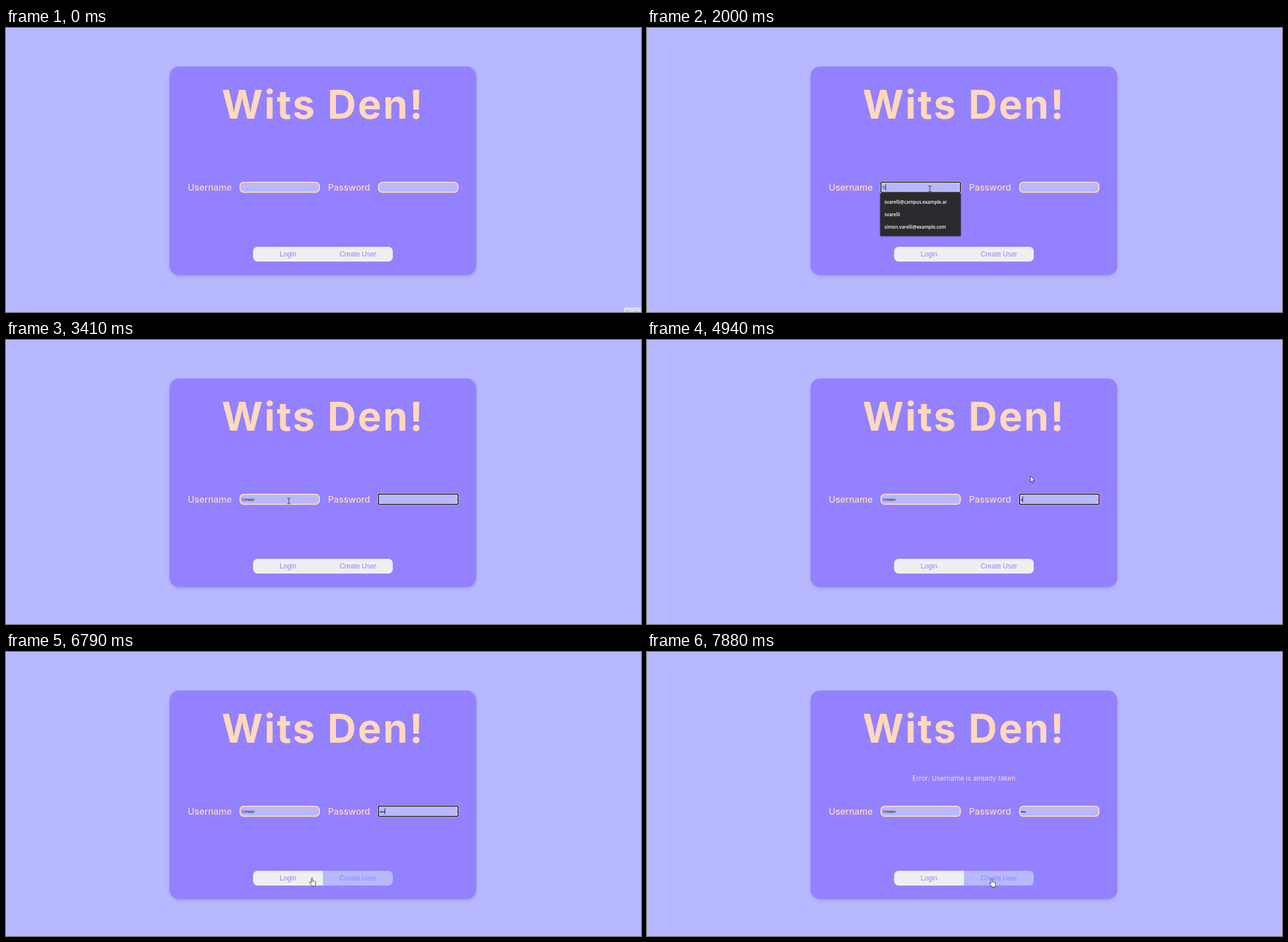
These frames come from a looping animation (1118x501 px, 8 s). An HTML page:

```html
<!DOCTYPE html>
<html lang="en">
<head>
<meta charset="utf-8">
<title>Wits Den!</title>
<style>
  html, body { margin: 0; width: 100%; height: 100%; overflow: hidden; background: #b8b8ff; }
  svg { display: block; width: 100vw; height: 100vh; }
  text { font-family: Inter, sans-serif; fill: #ffd8be; white-space: pre; }
  .mid { text-anchor: middle; }
  .card { fill: #9381ff; filter: drop-shadow(0 2px 3px rgba(60, 40, 140, .18)); }
  .title { font-size: 70px; font-weight: 700; letter-spacing: 2.8px; }
  .label { font-size: 15.8px; font-weight: 500; }
  .error { font-size: 11.75px; }
  .field { fill: #b8b8ff; stroke: #ffd8be; stroke-width: 2; }
  .ring { fill: none; stroke: #101010; stroke-width: 1.5; }
  .ring .halo { stroke: #fff; stroke-width: .8; }
  .button { fill: #efefef; }
  .button.hover { fill: #b8b8ff; }
  .caption { font: 12px "Liberation Sans", Arial, sans-serif; fill: #9381ff; }
  .typed { font: 8px "Liberation Sans", Arial, sans-serif; fill: #000; }
  .typed .pale { fill: #3d3a5c; }
  #list rect { fill: #2a2b2e; filter: drop-shadow(0 1px 1px rgba(0, 0, 0, .35)); }
  #list text { font: 600 8px "Open Sans", "Noto Sans", sans-serif; fill: #fff; }
  #tip text { font: 10px "Liberation Sans", Arial, sans-serif; fill: #999; }
  #cursor path { fill: #fff; stroke: #111; stroke-width: .8; stroke-linejoin: round; }
  #cursor .beam { fill: none; stroke: #333; stroke-width: 1; }
</style>
</head>
<body>
<svg viewBox="0 0 1118 501">
  <rect class="card" x="288" y="68" width="540" height="368" rx="17"/>
  <text class="title mid" x="558" y="160">Wits Den!</text>
  <text class="error mid" id="error" x="558" y="226.6">Error: Username is already taken</text>

  <text class="label" x="320" y="287">Username</text>
  <text class="label" x="567" y="287">Password</text>
  <rect class="field" id="field" x="412" y="272.3" width="139.7" height="17.4" rx="6.5"/>
  <use href="#field" x="244"/>
  <g id="ring" class="ring">
    <rect class="halo" x="410.8" y="271.1" width="142.1" height="19.8" rx="3"/>
    <rect x="411.8" y="272.1" width="140.1" height="17.8" rx="2.5"/>
  </g>
  <text class="typed" id="name" y="284"><tspan class="pale" id="head" x="414.5"></tspan><tspan id="tail"></tspan></text>
  <text class="typed" id="dots" x="658.3" y="284"></text>
  <rect id="caret" y="276" width=".9" height="10"/>

  <path class="button" id="login" d="M443 386h115v26h-115a8 8 0 0 1-8-8v-10a8 8 0 0 1 8-8z"/>
  <path class="button" id="create" d="M673 386h-115v26h115a8 8 0 0 0 8-8v-10a8 8 0 0 0-8-8z"/>
  <text class="caption mid" x="496.5" y="403">Login</text>
  <text class="caption mid" x="619.5" y="403">Create User</text>

  <g id="list"></g>
  <g id="tip">
    <rect x="1088" y="493" width="40" height="16" fill="#dcdcec"/>
    <text x="1091" y="505.5">Captura</text>
  </g>
  <g id="cursor">
    <path id="arrow" d="M0 0V10.8L2.5 8.5L4.2 12.3L5.9 11.5L4.2 7.8H7.4Z"/>
    <path id="beam" class="beam" d="M-3-5H-1Q0-5 0-4Q0-5 1-5H3M0-4V4M-3 5H-1Q0 5 0 4Q0 5 1 5H3"/>
    <path id="hand" d="M-1.2 8.5V1.2a1.2 1.2 0 0 1 2.4 0V6c.3-1 2-.8 2.1.3c.5-.7 1.8-.5 1.9.5c.6-.5 1.5-.2 1.5.8V10c0 2-1 2.5-1 4.5H.3C0 12.5-2 11.5-4 8.5c-.6-1 .6-2 1.5-1.2z"/>
  </g>
</svg>
<script>
const LOOP = 8000, TICK = 1000 / 15;
const $ = id => document.getElementById(id);
const show = (id, on) => { $(id).style.display = on ? '' : 'none'; };
const clamp = (v, max = 1) => Math.max(0, Math.min(max, v));
const easeOut = k => 1 - (1 - k) ** 2;

const NAME = 'Simon';
const ITEMS = ['svarelli@campus.example.ar', 'svarelli', 'simon.varelli@example.com',
  'prueba', 'invitado', 'admin'];

// all times below are in ticks
const focusUser = 15, focusPass = 43, blur = 116, failed = 118, blink = 8;
const nameKeys = { start: 30, gap: 2.1, max: NAME.length };
const dotKeys = { start: 74, gap: 5, max: 3 };

const entry = [830, 512];
const moves = [
  { start: 0, end: 13, to: [498, 284] },
  { start: 64, end: 68, to: [675, 240] },
  { start: 90, end: 96, to: [640, 397] },
  { start: 99, end: 105, to: [505, 399] },
  { start: 110, end: 116, to: [607, 400] }
];

function pointerAt(tick) {
  return moves.reduce((from, { start, end, to }) => {
    const k = easeOut(clamp((tick - start) / (end - start)));
    return from.map((v, i) => v + (to[i] - v) * k);
  }, entry);
}

const inside = ([x, y], l, t, r, b) => x >= l && x < r && y >= t && y < b;
const overLogin = p => inside(p, 435, 386, 558, 412);
const overCreate = p => inside(p, 558, 386, 681, 412);
const overField = p => inside(p, 411, 271, 553, 291) || inside(p, 655, 271, 797, 291);

const countKeys = ({ start, gap, max }, tick) => clamp(Math.floor((tick - start) / gap) + 1, max);
const lastKey = ({ start, gap }, count) => count ? start + gap * (count - 1) : 0;

function drawList(tick, count) {
  const opacity = tick < focusPass ? clamp((tick - 14) / 2) : clamp((46 - tick) / 3.75);
  const items = ITEMS.filter((s, i) => !count || (count < 2 ? i < 3 : i === 2));
  const height = 9.7 + 22.1 * items.length;
  const rows = items.map((s, i) => `<text x="418" y="${310.2 + 22.1 * i}">${s}</text>`);
  const scale = .93 + .07 * opacity, cy = 291 + height / 2;
  $('list').innerHTML = `<rect x="410.5" y="291" width="142" height="${height}" rx="2"/>` + rows.join('');
  $('list').setAttribute('opacity', opacity);
  $('list').setAttribute('transform',
    `translate(481.5 ${cy}) scale(${scale}) translate(-481.5 ${-cy})`);
}

function draw(time) {
  const tick = Math.floor((time % LOOP + 20) / TICK);
  const letters = countKeys(nameKeys, tick), dots = countKeys(dotKeys, tick);
  const inPass = tick >= focusPass;
  const focused = tick >= focusUser && tick < blur;

  $('head').textContent = NAME.slice(0, Math.min(2, letters));
  $('tail').textContent = NAME.slice(2, Math.max(2, letters));
  $('dots').textContent = '•'.repeat(dots);

  show('ring', focused);
  $('ring').setAttribute('transform', `translate(${inPass ? 244 : 0})`);
  const since = inPass ? Math.max(focusPass, lastKey(dotKeys, dots))
    : Math.max(focusUser, lastKey(nameKeys, letters));
  show('caret', focused && Math.floor((tick - since) / blink) % 2 === 0);
  const typed = $(inPass ? 'dots' : 'name');
  $('caret').setAttribute('x', (inPass ? 658.2 : 414.4) + typed.getComputedTextLength());

  drawList(tick, letters);
  show('error', tick >= failed);
  show('tip', tick < 1);

  // hover follows the pointer one tick late
  const was = pointerAt(tick - 1), now = pointerAt(tick);
  $('login').classList.toggle('hover', overLogin(was));
  $('create').classList.toggle('hover', overCreate(was));
  const beam = overField(now), hand = overLogin(now) || overCreate(now);
  show('beam', beam);
  show('hand', hand);
  show('arrow', !beam && !hand);
  $('cursor').setAttribute('transform', `translate(${now})`);
}

const start = performance.now();
function loop() {
  draw(performance.now() - start);
  requestAnimationFrame(loop);
}
loop();
</script>
</body>
</html>
```
